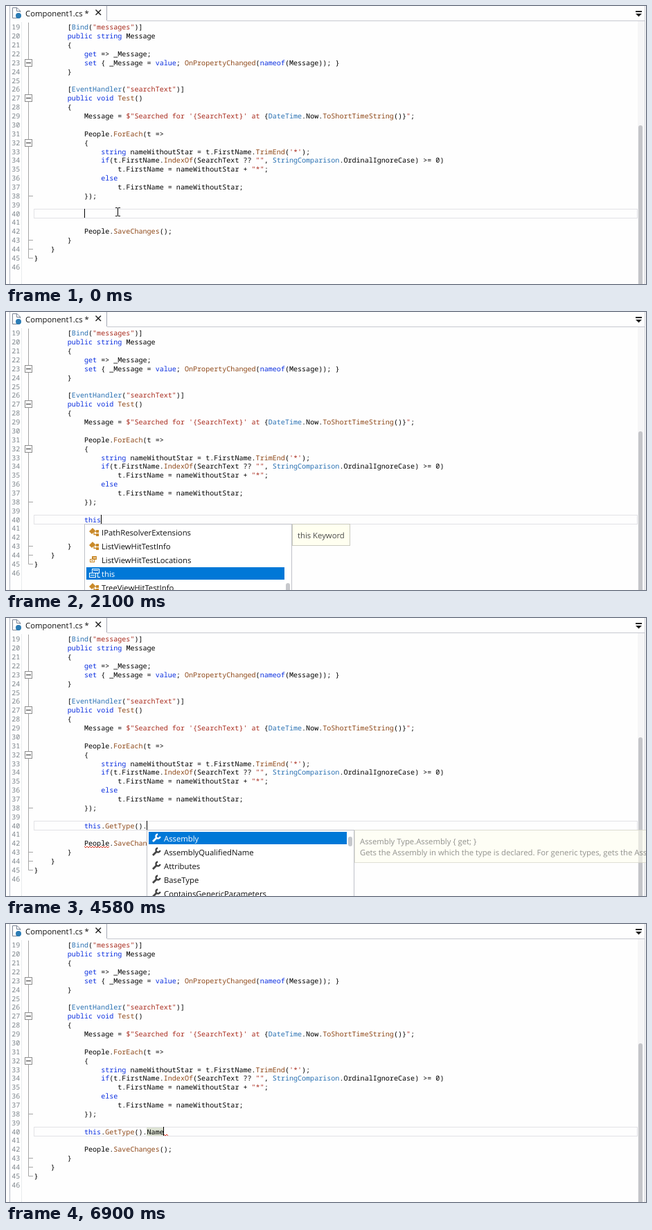
Animation, 924 px wide and 403 px high, one loop 7220 ms. Source, as an HTML page with a canvas:

```html
<!DOCTYPE html>
<html lang="en">
<head>
<meta charset="utf-8">
<title>Code completion</title>
<style>
html, body { margin: 0; width: 100%; height: 100%; overflow: hidden; background: #fff; }
canvas { display: block; width: 924px; height: 403px; }
</style>
</head>
<body>
<canvas id="stage" width="924" height="403"></canvas>
<script>
const ctx = document.getElementById('stage').getContext('2d');
const LOOP = 7220;
const CHAR = 6.04, LEFT = 40.5, LINE = 12.87;
const MONO = '10.07px "Noto Sans Mono", "DejaVu Sans Mono", monospace';
const UI = '11.3px "Open Sans", "Noto Sans", sans-serif';
const COLOR = {
  text: '#000', keyword: '#0b2fe0', type: '#2870b2',
  method: '#8e4818', string: '#a82a1c', number: '#7e868c', error: '#d8301c'
};
const KEYWORDS = /^(public|string|void|get|set|value|nameof|if|else|this)$/;
const TYPES = /^(Bind|EventHandler|DateTime|StringComparison)$/;
const TOKEN = /(\$"[^}]*}|' at |"(?:[^"]*")?|'\*')|(\w+)|[^\s\w]/g;

const code = `        [Bind("messages")]
        public string Message
        {
            get => _Message;
            set { _Message = value; OnPropertyChanged(nameof(Message)); }
        }

        [EventHandler("searchText")]
        public void Test()
        {
            Message = $"Searched for '{SearchText}' at {DateTime.Now.ToShortTimeString()}";

            People.ForEach(t =>
            {
                string nameWithoutStar = t.FirstName.TrimEnd('*');
                if(t.FirstName.IndexOf(SearchText ?? "", StringComparison.OrdinalIgnoreCase) >= 0)
                    t.FirstName = nameWithoutStar + "*";
                else
                    t.FirstName = nameWithoutStar;
            });



            People.SaveChanges();
        }
    }
}
`.split('\n');

const lists = {
  all: { x: 113, sel: 0, thumb: [317, 8], items: [['iface', '_AppDomain'], ['field', '_Message'],
    ['enum', 'AccessibleEvents'], ['enum', 'AccessibleNavigation'], ['class', 'AccessibleObject']] },
  self: { x: 113, sel: 3, thumb: [393, 20], items: [['class', 'IPathResolverExtensions'],
    ['class', 'ListViewHitTestInfo'], ['enum', 'ListViewHitTestLocations'], ['key', 'this'],
    ['class', 'TreeViewHitTestInfo']] },
  members: { x: 113, sel: 0, thumb: [317, 58], items: [['field', '_Message'], ['method', 'Configure'],
    ['method', 'Equals'], ['method', 'GetHashCode'], ['method', 'GetType']] },
  getters: { x: 113, sel: 0, items: [['method', 'GetHashCode'], ['method', 'GetType']] },
  getType: { x: 113, sel: 0, items: [['method', 'GetType']] },
  type: { x: 203, sel: 0, thumb: [317, 14], items: [['prop', 'Assembly'], ['prop', 'AssemblyQualifiedName'],
    ['prop', 'Attributes'], ['prop', 'BaseType'], ['prop', 'ContainsGenericParameters']] },
  na: { x: 203, sel: 2, items: [['prop', 'IsSpecialName'], ['prop', 'IsUnicodeClass'], ['prop', 'Name'],
    ['snippet', 'namespace'], ['prop', 'Namespace']] },
  nam: { x: 203, sel: 2, items: [['prop', 'FullName'], ['prop', 'IsSpecialName'], ['prop', 'Name'],
    ['snippet', 'namespace'], ['prop', 'Namespace']] }
};

const tips = {
  domain: [413, 822, 'interface System._AppDomain',
    'Exposes the public members of the AppDomain class to unmanaged code.'],
  self: [413, 497, 'this Keyword'],
  field: [413, 617, '(field) string Component1._Message'],
  hash: [413, 609, 'int object.GetHashCode()', 'Serves as the default hash function.'],
  getType: [413, 626, 'Type object.GetType()', 'Gets the Type of the current instance.'],
  assembly: [503, 1290, 'Assembly Type.Assembly { get; }',
    'Gets the Assembly in which the type is declared. For generic types, gets the Assembly in which the generic type is defined.'],
  name: [503, 785, 'string System.Reflection.MemberInfo.Name { get; }', 'Gets the name of the current member.']
};

// Each step overrides part of the state from its time on.
const steps = [
  [0, { text: '', back: 0, caret: true, beam: true, list: '', tip: '', fade: 0, wave: null, broken: false, mark: false }],
  [150, { caret: false }],
  [700, { caret: true }],
  [1080, { list: 'all', tip: 'domain' }],
  [1160, { fade: 0.14 }],
  [1230, { fade: 0.6, caret: false }],
  [1310, { fade: 1 }],
  [1710, { text: 't', caret: true, beam: false, tip: '' }],
  [1790, { list: 'self', tip: 'self', fade: 0 }],
  [1870, { text: 'th', fade: 0.14 }],
  [1940, { fade: 0.6 }],
  [2020, { text: 'thi', fade: 1 }],
  [2100, { text: 'this' }],
  [2250, { text: 'this.' }],
  [2570, { list: 'members', tip: 'field', fade: 0 }],
  [2650, { fade: 0.14 }],
  [2720, { fade: 0.6 }],
  [2800, { fade: 1, caret: false }],
  [2950, { text: 'this.g', caret: true }],
  [3030, { list: 'getters', tip: 'hash', fade: 0.14 }],
  [3110, { text: 'this.ge', fade: 0.6 }],
  [3190, { text: 'this.get', fade: 1 }],
  [3340, { text: 'this.gett', list: 'getType', tip: 'getType' }],
  [3490, { text: 'this.getty' }],
  [3720, { text: 'this.GetType', list: '', fade: 0.75, wave: [143, 191] }],
  [3800, { tip: '' }],
  [3950, { text: 'this.GetType()', back: 1, wave: null }],
  [4120, { back: 0, wave: [198, 204] }],
  [4350, { text: 'this.GetType().', wave: null, broken: true }],
  [4430, { list: 'type', tip: 'assembly', fade: 0 }],
  [4500, { fade: 0.14 }],
  [4580, { fade: 0.6 }],
  [4660, { fade: 1 }],
  [4810, { text: 'this.GetType().n', list: 'na', tip: 'name', fade: 0.14 }],
  [4890, { fade: 0.6 }],
  [4960, { text: 'this.GetType().na', fade: 1 }],
  [5110, { text: 'this.GetType().nam' }],
  [5190, { list: 'nam' }],
  [5360, { text: 'this.GetType().name', broken: false }],
  [5660, { text: 'this.GetType().Name', list: '', fade: 0.75 }],
  [5740, { tip: '' }],
  [5810, { wave: [228, 234] }],
  [5890, { mark: true }],
  [6370, { caret: false }],
  [6900, { caret: true }]
];

function stateAt(t) {
  return Object.assign({}, ...steps.filter(s => s[0] <= t).map(s => s[1]));
}

function rect(x, y, w, h, color) {
  ctx.fillStyle = color;
  ctx.fillRect(x, y, w, h);
}

function frame(x, y, w, h, color) {
  ctx.strokeStyle = color;
  ctx.lineWidth = 1;
  ctx.strokeRect(x + 0.5, y + 0.5, w - 1, h - 1);
}

function path(color, width, ...points) {
  ctx.strokeStyle = color;
  ctx.lineWidth = width;
  ctx.beginPath();
  for (let i = 0; i < points.length; i += 2) ctx.lineTo(points[i], points[i + 1]);
  ctx.stroke();
}

function fillPoly(color, ...points) {
  ctx.fillStyle = color;
  ctx.beginPath();
  for (let i = 0; i < points.length; i += 2) ctx.lineTo(points[i], points[i + 1]);
  ctx.fill();
}

function ring(x, y, r, color, width) {
  ctx.beginPath();
  ctx.arc(x, y, r, 0, 7);
  ctx.strokeStyle = color;
  ctx.lineWidth = width;
  ctx.stroke();
}

function round(x, y, w, h, r, color) {
  ctx.fillStyle = color;
  ctx.beginPath();
  ctx.roundRect(x, y, w, h, r);
  ctx.fill();
}

function label(text, x, y, font, color) {
  ctx.font = font;
  ctx.fillStyle = color;
  ctx.fillText(text, x, y);
}

const baseline = n => Math.round(304.6 + (n - 40) * LINE);
const column = n => LEFT + n * CHAR;

function tokenColor(line, match) {
  const [word, quoted, name] = match;
  if (quoted) return COLOR.string;
  if (!name) return COLOR.text;
  if (KEYWORDS.test(word)) return COLOR.keyword;
  if (TYPES.test(word)) return COLOR.type;
  return line[match.index + word.length] === '(' ? COLOR.method : COLOR.text;
}

function codeLine(line, n) {
  for (const match of line.matchAll(TOKEN)) {
    label(match[0], column(match.index), baseline(n), MONO, tokenColor(line, match));
  }
}

function squiggle(x1, x2, y) {
  const points = [];
  for (let x = x1, i = 0; x <= x2; x += 2, i++) points.push(x, y + (i % 2 ? 2 : 0));
  path(COLOR.error, 1, ...points);
}

function header() {
  path('#c6c8d0', 1, 146, 21.5, 922, 21.5);
  path('#a4a8b4', 1, 145.5, 0, 145.5, 21);
  path('#7b8494', 1, 19.5, 17.5, 9.5, 17.5, 9.5, 2.5, 16, 2.5, 20.5, 7, 20.5, 9);
  path('#7b8494', 1, 15.5, 2.5, 15.5, 7.5, 20.5, 7.5);
  ctx.fillStyle = '#2b7cb5';
  ctx.beginPath();
  ctx.arc(18, 14, 4, 0, 7);
  ctx.fill();
  label('Component1.cs *', 28, 14.5, UI, '#101010');
  path('#202020', 1.5, 129.5, 5.5, 137, 13);
  path('#202020', 1.5, 137, 5.5, 129.5, 13);
  rect(909, 7, 9, 2, '#202020');
  fillPoly('#202020', 909, 11, 918, 11, 913.5, 15.5);
}

function gutter() {
  path('#b8bcc8', 1, 5.5, 0, 5.5, 403);
  ctx.setLineDash([1, 1]);
  path('#d4dadd', 1, 22.5, 24, 22.5, 403);
  ctx.setLineDash([]);
  path('#a5a5a5', 1, 32.5, 24, 32.5, 365.5, 39, 365.5);
  for (const y of [275.5, 339.5, 352.5]) path('#a5a5a5', 1, 32, y, 39, y);
  for (const y of [82, 133, 198]) {
    rect(27, y - 5, 11, 11, '#fff');
    frame(27, y - 5, 11, 11, '#8c8c8c');
    rect(29, y, 7, 1, '#303030');
  }
  code.forEach((_, i) => label(String(19 + i), 8.3, baseline(19 + i), MONO, COLOR.number));
}

const icons = {
  iface(x, y, on) {
    const c = on ? '#fff' : '#1e6fb8';
    ring(x + 3, y, 2.4, c, 1.3);
    ring(x + 11.5, y, 3.4, c, 1.5);
    path(c, 1.3, x + 5, y, x + 8, y);
  },
  cube(x, y, fill, edge) {
    const outline = [x, y - 5, x + 4.5, y - 2.5, x + 4.5, y + 2.5, x, y + 5, x - 4.5, y + 2.5, x - 4.5, y - 2.5, x, y - 5];
    fillPoly(fill, ...outline);
    path(edge, 1, ...outline);
    path(edge, 1, x - 4.5, y - 2.5, x, y, x + 4.5, y - 2.5);
    path(edge, 1, x, y, x, y + 5);
  },
  field(x, y, on) {
    icons.cube(x + 6, y - 1.5, '#1d5fa8', on ? '#fff' : '#cfe2f5');
    rect(x + 9, y + 1, 6, 6, on ? '#fff' : '#444');
    rect(x + 11, y + 3, 2, 2, on ? '#a02020' : '#fff');
  },
  method(x, y) { icons.cube(x + 5, y - 0.5, '#f4eefa', '#8a5cb4'); },
  enum(x, y) {
    rect(x + 4, y - 5, 7, 5, '#c98a2b');
    rect(x + 6, y - 3, 4, 1, '#fff');
    rect(x + 1, y - 1, 7, 5, '#fff');
    frame(x + 1, y - 1, 7, 5, '#c98a2b');
    rect(x + 3, y + 1, 3, 1, '#c98a2b');
  },
  class(x, y) {
    fillPoly('#c98a2b', x + 5, y - 6, x + 9, y - 2, x + 4, y + 3, x, y - 1);
    path('#c98a2b', 1.3, x + 6, y - 1, x + 10, y - 1);
    path('#c98a2b', 1.3, x + 7, y - 1, x + 7, y + 3.5, x + 10, y + 3.5);
    rect(x + 10, y - 3, 4, 4, '#c98a2b');
    rect(x + 10, y + 2, 4, 4, '#c98a2b');
  },
  key(x, y, on) {
    const c = on ? '#fff' : '#444';
    frame(x + 4, y - 7, 11, 7, c);
    rect(x + 6, y - 5, 7, 1, c);
    frame(x, y - 1, 10, 7, c);
    rect(x + 2, y + 2, 6, 1, c);
    path(c, 1, x + 12.5, y, x + 12.5, y + 5.5, x + 16, y + 5.5);
  },
  prop(x, y, on) {
    const c = on ? '#fff' : '#454545';
    path(c, 2.8, x + 2, y + 5, x + 8, y - 1);
    ctx.beginPath();
    ctx.arc(x + 9.5, y - 2.5, 3, 0.1, 4.6);
    ctx.strokeStyle = c;
    ctx.lineWidth = 2.4;
    ctx.stroke();
  },
  snippet(x, y) {
    frame(x + 2, y - 6, 11, 12, '#666');
    ctx.setLineDash([1, 1]);
    path('#fff', 1, x + 2, y - 5.5, x + 13, y - 5.5);
    path('#fff', 1, x + 2, y + 5.5, x + 13, y + 5.5);
    ctx.setLineDash([]);
  }
};

function popup({ x, sel, thumb, items }) {
  const height = items.length * 20 + 6;
  rect(x, 307, 300, height, '#fff');
  frame(x, 307, 300, height, '#bfc1c8');
  items.forEach(([icon, text], i) => {
    const mid = 320 + i * 20, on = i === sel;
    if (on) rect(x + 3, mid - 10, 286, 18, '#0078d7');
    icons[icon](x + 7, mid - 1, on);
    label(text, x + 25, mid + 4, UI, on ? '#fff' : '#101010');
  });
  if (thumb) round(x + 291, thumb[0], 6, thumb[1], 3, '#c6c8cc');
}

function tooltip([x1, x2, ...rows], fade) {
  const height = 16 + rows.length * 16;
  ctx.globalAlpha = fade;
  rect(x1, 307, x2 - x1, height, '#fffff0');
  frame(x1, 307, x2 - x1, height, '#cbcbc0');
  rows.forEach((row, i) => label(row, x1 + 8, 328 + i * 16, UI, '#4a4a4a'));
  ctx.globalAlpha = 1;
}

function beam() {
  path('#000', 1, 161.5, 293, 161.5, 304);
  for (const y of [292.5, 304.5]) {
    path('#000', 1, 158, y, 161, y);
    path('#000', 1, 162, y, 165, y);
  }
}

function draw(t) {
  const s = stateAt(t);
  rect(0, 0, 924, 403, '#fefefe');
  header();
  gutter();
  rect(912, 22, 10, 381, '#f6f6f7');
  path('#d0d2d8', 1, 922.5, 0, 922.5, 403);
  round(913, 173, 6, 240, 3, '#c4c5c9');
  frame(40, 294, 872, 14, '#e2e2e6');
  if (s.mark) rect(203, 295, 25, 12, '#dde3d4');
  code.forEach((line, i) => codeLine(line, 19 + i));
  codeLine(' '.repeat(12) + s.text, 40);
  if (s.wave) squiggle(...s.wave, 305);
  if (s.broken) squiggle(113, 149, 331);
  if (s.caret) rect(Math.floor(column(12 + s.text.length - s.back) + 0.1), 294, 1, 13, '#000');
  if (s.list) popup(lists[s.list]);
  if (s.tip) tooltip(tips[s.tip], s.fade);
  if (s.beam) beam();
}

ctx.textRendering = 'geometricPrecision';
const start = performance.now();
function tick() {
  draw((performance.now() - start) % LOOP);
  requestAnimationFrame(tick);
}
tick();
</script>
</body>
</html>
```
